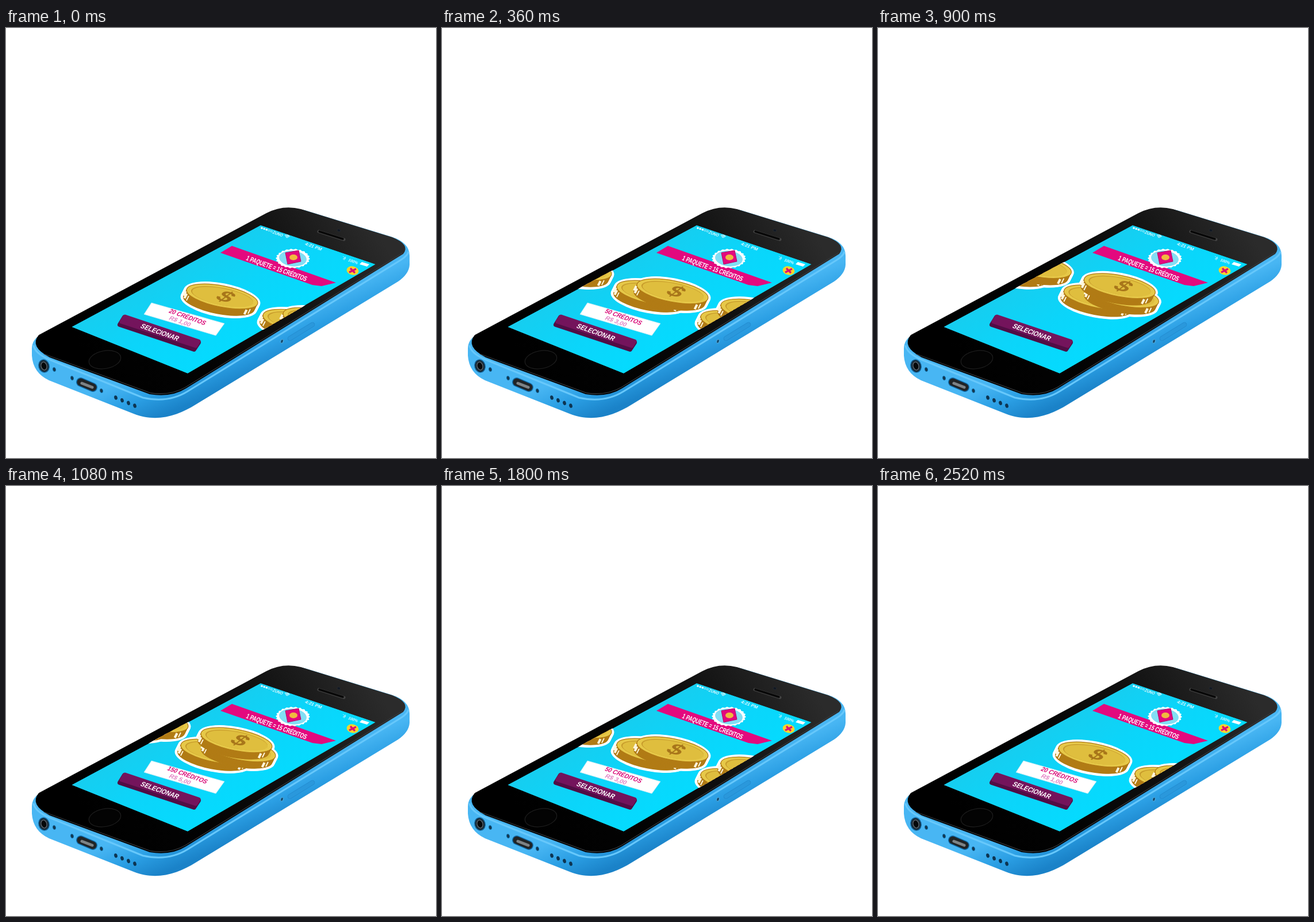
An HTML page with a canvas that plays this animation: 748x748 px, repeating every 2.7 s.

```html
<!DOCTYPE html>
<html lang="pt">
<head>
<meta charset="utf-8">
<style>
html, body { margin: 0; width: 100%; height: 100%; overflow: hidden; background: #fff; }
canvas { display: block; width: 748px; height: 748px; }
</style>
</head>
<body>
<canvas id="stage" width="748" height="748"></canvas>
<script>
const c = document.getElementById('stage').getContext('2d');
const LOOP = 2700, STARTS = [60, 780, 1500, 2220], PAGES = [0, 1, 2, 1, 0];
const SHIFT = [0, 143, 289], SLOPE = 0.35;
const OFFERS = [['20 CRÉDITOS', 'R$ 1,00'], ['50 CRÉDITOS', 'R$ 3,00'], ['150 CRÉDITOS', 'R$ 5,00']];
const STACKS = [[[0, 0]], [[-10, -6], [25, -9]], [[-10, -5], [31, -9], [25, -25]]];
const GOLD = '#b17b15', SCREEN = [443, 343, 643, 411, 316, 601, 114, 520];
const FONT = '"Liberation Sans", Arial, sans-serif';

function paint(path, fill, stroke, width = 1) {
  if (fill) { c.fillStyle = fill; c.fill(path); }
  if (stroke) { c.strokeStyle = stroke; c.lineWidth = width; c.stroke(path); }
}
function shape(d, fill, stroke, width) { paint(new Path2D(d), fill, stroke, width); }
function poly(p, fill, stroke, width) { shape('M' + p.join(' ') + 'Z', fill, stroke, width); }
function oval(x, y, rx, ry, deg, fill, stroke, width) {
  const p = new Path2D();
  p.ellipse(x, y, rx, ry, deg * Math.PI / 180, 0, 7);
  paint(p, fill, stroke, width);
}
function gradient(x0, y0, x1, y1, ...colors) {
  const g = c.createLinearGradient(x0, y0, x1, y1);
  colors.forEach((k, i) => g.addColorStop(i / (colors.length - 1), k));
  return g;
}
// Text lying on the tilted screen, centred on (x, y)
function label(str, x, y, size, color, squeeze, axis = [-0.58, 0.78]) {
  c.save();
  c.transform(0.94 * squeeze, 0.335 * squeeze, ...axis, x, y);
  c.font = `bold ${size}px ${FONT}`;
  c.textAlign = 'center';
  c.fillStyle = color;
  c.fillText(str, 0, size * 0.36);
  c.restore();
}

function phone() {
  shape('M45 558Q45 542 60 534L455 324Q485 308 520 317L670 363Q702 373 702 396V412Q701 428 682 441L330 655C300 674 262 687 222 671L75 613Q47 600 45 570Z',
    gradient(330, 560, 362, 636, '#48b6f3', '#2b9fe4', '#1a82c8'));
  // Bright lip around the glass
  shape('M48 552Q50 566 76 577L238 643Q282 653 316 632L686 404Q699 396 700 389', null, '#67c8fb', 3);
  shape('M57 534L453 322Q482 307 513 315L672 364Q704 377 691 393L313 627Q288 643 250 637L76 573Q40 554 57 534Z',
    gradient(150, 600, 640, 340, '#000', '#030303', '#111', '#2b2b2b'));
  shape('M66 567L252 635Q286 640 312 625L690 391', null, '#34383b', 1.3);

  oval(172, 577, 28, 15.5, -10, '#030303', '#1f1f1f', 1.2);
  c.lineCap = 'round';
  shape('M544 354L588 368', null, '#444', 5);
  shape('M545 354L586 367', null, '#080808', 3.5);
  oval(579, 352, 3, 2.2, 15, '#101722', '#262a30');

  // Bottom edge: jack, holes, connector, speaker
  oval(66, 588, 9, 11, -15, '#172a36', '#125f94', 1.5);
  oval(66, 588, 5, 7, -15, '#05080a', '#58616a', 1.5);
  for (const [x, y] of [[84, 594], [115, 609], [166, 631]]) oval(x, y, 2.6, 3.6, -15, '#15384f', '#1270ab');
  shape('M130 616L151 625', null, '#106aa6', 16);
  shape('M130 616L151 625', null, '#202426', 13);
  shape('M132 618L150 625', null, '#7d8386', 5);
  for (let i = 0; i < 4; i++) oval(191 + i * 11, 643 + i * 4.7, 2.8, 3.8, -15, '#0d3552');
  shape('M494 540L533 516', null, '#2187cb', 8.5);
  shape('M494 540L533 516', null, '#2a98dc', 7);
  oval(480, 545, 2.5, 3.5, 20, '#164f75', '#5bb9ec');
  c.lineCap = 'butt';
}

function statusBar() {
  const lean = [-0.5, 0.75];
  for (let i = 0; i < 5; i++)
    oval(445 + i * 4.2, 348 + i * 1.45, 1.6, 1.3, 0, i < 3 ? '#fff' : null, '#d6f7ff', 0.7);
  label('ZUNO', 473, 358, 8, '#e4faff', 0.8, lean);
  for (let r = 2; r < 7; r += 2) {
    c.beginPath();
    c.arc(488, 366, r, -2.1, -0.5);
    c.strokeStyle = '#e4faff';
    c.lineWidth = 1.2;
    c.stroke();
  }
  label('4:21 PM', 535, 380, 8.5, '#e4faff', 0.95, lean);
  shape('M586 397L591 401L586 402L591 398L588 404', null, '#c9f4ff', 0.7);
  label('100%', 604, 406, 8, '#e4faff', 0.85, lean);
  poly([619, 407, 632, 411, 628, 415, 615, 411], '#fff');
}

function header() {
  poly([393, 379, 574, 443, 549, 449, 533, 447, 373, 391], '#e3097e');
  const edge = new Path2D();
  for (let i = 0; i <= 88; i++) {
    const a = i / 88 * Math.PI * 2, r = i % 4 < 2 ? 1.02 : 0.96;
    edge.lineTo(499 + Math.cos(a) * 29 * r, 401 + Math.sin(a) * 16.5 * r);
  }
  paint(edge, '#fff');
  oval(499, 401, 24, 13.5, 6, '#82def4');
  poly([486, 391, 509, 387, 513, 406, 490, 411], '#e3097e', '#b30663', 1);
  oval(500, 399, 7, 5, 0, '#f0b93f');
  label('1 PAQUETE = 15 CRÉDITOS', 471, 418, 13, '#fff', 0.645, [-0.42, 0.84]);
  oval(603, 422, 10.5, 7.5, 12, '#f4d52b');
  shape('M599 418L607 426M609 419L597 425', null, '#dc0d75', 3.2);
}

const RX = 63, RY = 18.5, TILT = 11, TURN = TILT * Math.PI / 180;
function coinBody(x, y, grow, fill) {
  for (let i = 20; i >= 0; i--) oval(x - i * 0.3, y + i * 0.6, RX + grow, RY + grow, TILT, fill);
}
function coin(x, y) {
  coinBody(x, y, 0, GOLD);
  // Glints on the rim
  [[178, 4], [165, 4], [154, 2], [42, 4], [33, 2]].forEach(([deg, w]) => {
    const a = deg * Math.PI / 180, u = RX * Math.cos(a), v = RY * Math.sin(a);
    const px = x + u * Math.cos(TURN) - v * Math.sin(TURN);
    const py = y + u * Math.sin(TURN) + v * Math.cos(TURN);
    shape(`M${px - 1} ${py + 2}L${px - 5} ${py + 10}`, null, '#fff6dc', w);
  });
  oval(x, y, RX, RY, TILT, '#e6c848', GOLD, 1.2);
  oval(x, y, RX - 8, RY - 3.5, TILT, '#c79b2b');
  oval(x + 1, y + 0.8, RX - 9, RY - 4, TILT, '#dfbe3e');
  c.save();
  c.transform(1.4, 0.5, -0.95, 0.7, x + 7, y);
  c.font = `bold 30px ${FONT}`;
  c.textAlign = 'center';
  c.fillStyle = '#a8761a';
  c.fillText('$', 0, 10.5);
  c.restore();
}
function stack(coins, dx) {
  const spots = coins.map(([x, y]) => [376 + x + dx, 467 + y + dx * SLOPE]);
  spots.forEach(([x, y]) => coinBody(x, y, 4.5, '#fff'));
  spots.forEach(([x, y]) => coin(x, y));
}

function card([credits, price], scale, alpha) {
  c.save();
  c.globalAlpha = alpha;
  c.translate(310, 506);
  c.scale(scale, scale);
  c.translate(-310, -506);
  poly([253, 478, 380, 514, 365, 535, 240, 498], '#fff', '#b6e8f2', 0.8);
  label(credits, 316, 502.5, 12, '#d90c78', 0.85);
  label(price, 303, 510, 11, '#e386c6', 1);
  c.restore();
}

function button() {
  c.lineJoin = 'round';
  poly([206, 503, 335, 547, 327, 559, 198, 516], '#510d45', '#510d45', 8);
  poly([207, 502, 335, 545, 330, 553, 201, 511], '#74145c', '#74145c', 7);
  c.lineJoin = 'miter';
  label('SELECIONAR', 268, 529, 13, '#fff', 0.81);
}

// Ten steps per slide, with one longer hold halfway
function stateAt(t) {
  const k = STARTS.filter(s => s <= t).length;
  if (!k) return { x: 0, page: 0, fade: 0 };
  const d = t - STARTS[k - 1];
  const n = Math.min(10, Math.floor(d / 30) + (d < 150 ? 1 : 0));
  const ease = 1 - (1 - (n - 0.2) / 9.8) ** 3;
  const from = PAGES[k - 1], to = PAGES[k];
  return {
    x: SHIFT[from] + (SHIFT[to] - SHIFT[from]) * ease,
    page: n < 5 ? from : to,
    fade: n < 5 ? n : 10 - n
  };
}

function draw(now) {
  const { x, page, fade } = stateAt(now % LOOP);
  c.fillStyle = '#fff';
  c.fillRect(0, 0, 748, 748);
  phone();
  c.save();
  c.clip(new Path2D('M' + SCREEN.join(' ') + 'Z'));
  poly(SCREEN, gradient(330, 390, 420, 550, '#17cdef', '#0bd5fa', '#04dbff'));
  statusBar();
  header();
  STACKS.forEach((coins, i) => stack(coins, SHIFT[i] - x));
  if (fade < 5) card(OFFERS[page], 1 - 0.18 * fade, 1 - 0.24 * fade);
  button();
  c.restore();
}

const begin = performance.now();
(function tick() {
  draw(performance.now() - begin);
  requestAnimationFrame(tick);
})();
</script>
</body>
</html>
```
